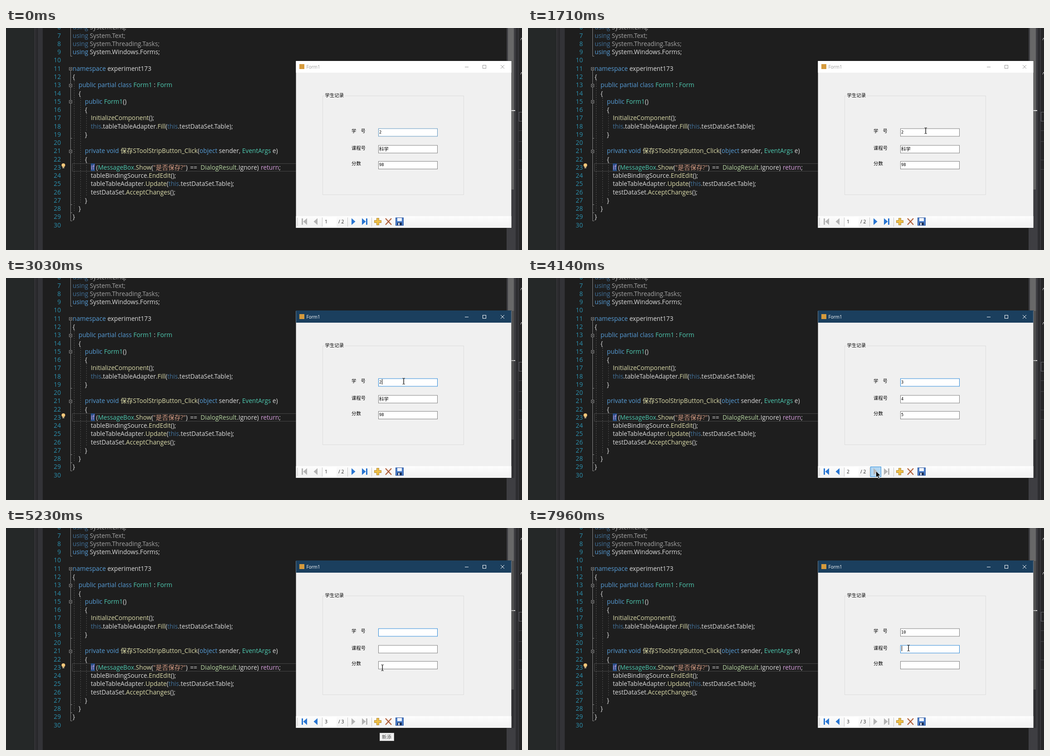
These frames come from a looping animation (1138 px wide and 492 px high, 8000 ms). An HTML page with a canvas:

```html
<!DOCTYPE html>
<html lang="zh">
<head>
<meta charset="utf-8">
<style>
html, body { margin: 0; width: 100%; height: 100%; overflow: hidden; background: #1e1e1e; }
canvas { display: block; }
</style>
</head>
<body>
<canvas id="stage" width="1138" height="492"></canvas>
<script>
const g = document.getElementById('stage').getContext('2d');
const CODE = '13.7px "Open Sans", "Noto Sans CJK SC", sans-serif';
const UI = '10.4px "Noto Sans CJK SC", "Noto Sans CJK", sans-serif';
const FIELD = '8.7px "DejaVu Sans Mono", monospace';
const BLUE = '#2a76d2', GREY = '#b4b4b4';
const INK = {
  b: '#569cd6', w: '#dcdcdc', t: '#4ec9b0', m: '#dcdcaa', s: '#d69d85',
  e: '#b8d7a3', d: '#41719a', f: '#a4a4a4', p: '#d8a0df'
};

// Row number: tokens as "x, ink, text"; without x a token follows the one before
const LINES = {
  6: '147d using |f System.Linq;',
  7: '147d using |f System.Text;',
  8: '147d using |f System.Threading.Tasks;',
  9: '147b using |w System.Windows.Forms;',
  11: '147b namespace |w experiment173',
  12: '147w {',
  13: '160b public partial class |t Form1|w  : |t Form',
  14: '160w {',
  15: '174b public |t Form1|w ()',
  16: '174w {',
  17: '187m InitializeComponent|w ();',
  18: '187d this|w .tableTableAdapter.|m Fill|w (|d this|w .testDataSet.Table);',
  19: '174w }',
  21: '174b private void |m 保存SToolStripButton_Click|w (|b object|w  sender, |t EventArgs|w  e)',
  22: '174w {',
  23: '187p if|w  (|t MessageBox|w .|m Show|w (|s "是否保存?"|w )|406w ==|429e DialogResult|509w .Ignore)|562p return|w ;',
  24: '187w tableBindingSource.|m EndEdit|w ();',
  25: '187w tableTableAdapter.|m Update|w (|d this|w .testDataSet.Table);',
  26: '187w testDataSet.|m AcceptChanges|w ();',
  27: '174w }',
  28: '160w }',
  29: '147w }'
};

// Pointer path: time, x, y, shape until the next key
const PATH = [
  [0, 868, 250, ''], [210, 868, 262, 'beam'], [290, 870, 285, 'beam'], [450, 872, 304, 'beam'],
  [680, 872, 304, 'beam'], [1000, 874, 268, 'beam'], [1470, 877, 227, 'beam'], [1900, 877, 228, 'beam'],
  [3430, 877, 229, ''], [3500, 806, 392, 'arrow'], [3650, 806, 392, 'arrow'], [3850, 767, 428, 'arrow'],
  [4440, 768, 428, 'arrow'], [4560, 823, 428, 'arrow'], [5160, 823, 428, 'arrow'],
  [5230, 830, 310, 'beam'], [5310, 832, 285, 'arrow'], [5450, 835, 252, 'arrow'], [5880, 834, 245, 'arrow'],
  [6110, 832, 241, 'arrow'], [6830, 832, 241, ''], [7270, 832, 243, 'arrow'], [7420, 837, 260, 'beam'],
  [7700, 839, 266, 'beam'], [8000, 839, 266, 'beam']
];
const CARET_ON = [[2020, 2500], [3030, 3560], [4450, 4980], [5510, 6040], [6570, 7270], [7820, 8000]];

const ramp = (t, from, to) => Math.min(1, Math.max(0, (t - from) / (to - from)));
const within = (t, from, to) => t >= from && t < to;

function box(x, y, w, h, color) {
  g.fillStyle = color;
  g.fillRect(x, y, w, h);
}
function frame(x, y, w, h, color) {
  g.strokeStyle = color;
  g.lineWidth = 1;
  g.strokeRect(x + .5, y + .5, w - 1, h - 1);
}
function text(str, x, y, color, font, align = 'left') {
  g.font = font;
  g.textAlign = align;
  g.fillStyle = color;
  g.fillText(str, x, y);
}
function poly(points, fill, stroke, width = 1) {
  g.beginPath();
  points.forEach(([x, y]) => g.lineTo(x, y));
  if (fill) { g.closePath(); g.fillStyle = fill; g.fill(); }
  if (stroke) { g.strokeStyle = stroke; g.lineWidth = width; g.stroke(); }
}
function fade(alpha, draw) {
  g.save();
  g.globalAlpha = alpha;
  draw();
  g.restore();
}

function rowY(row) { return 17 + (row - 7) * 18.26; }

function codeRow(row) {
  const y = rowY(row) + 4.7;
  text(row, 121, y, '#2b91af', CODE, 'right');
  if (!LINES[row]) return;
  let x = 0;
  for (const token of LINES[row].split('|')) {
    const [, start, ink, str] = token.match(/^(\d*)(\w) (.*)$/);
    if (start) x = +start;
    text(str, x, y, INK[ink], CODE);
    x += g.measureText(str).width;
  }
}

function editor() {
  box(0, 0, 1138, 492, '#1e1e1e');
  box(0, 0, 63, 492, '#252828');
  box(63, 0, 7, 492, '#2b2b2e');
  box(63, 0, 1, 492, '#404043');
  box(69, 0, 1, 492, '#202022');
  box(70, 0, 11, 492, '#333337');

  box(1104, 0, 20, 492, '#3e3e42');
  box(1107, 0, 13, 358, '#686868');
  box(1124, 0, 6, 492, '#2d2d30');
  box(1130, 0, 8, 492, '#252526');
  box(1130, 0, 1, 492, '#3f3f46');
  box(1114, 182, 9, 2, '#e6e6e6');
  frame(1131, 186, 9, 21, '#66666b');
  for (const y of [227, 251, 292, 313]) box(1130, y, 8, 1, '#46464a');
  for (const y of [22, 98]) poly([[1135, y + 5], [1137, y], [1138, y + 2]], null, '#c8c8c8');

  frame(146, 300, 500, 18, '#464646');
  box(187, 300, 9, 17, '#264f88');

  // Indent guides and folding marks
  g.setLineDash([2, 3]);
  for (const [x, top, end] of [[150.5, 118, 408], [164.5, 155, 390], [177.5, 190, 228], [177.5, 299, 372]])
    poly([[x, top], [x, end]], null, '#5a5a5a');
  g.setLineDash([]);
  const edge = '#8a8a8a';
  poly([[142.5, 0], [142.5, 62.5], [146, 62.5]], null, edge);
  poly([[142.5, 94], [142.5, 427.5], [146, 427.5]], null, edge);
  for (const y of [244, 391, 409]) box(142, y, 4, 1, edge);
  for (const row of [11, 13, 15, 21]) {
    const y = Math.round(rowY(row)) - 3;
    box(139, y, 7, 7, '#1e1e1e');
    frame(139, y, 7, 7, edge);
    box(141, y + 3, 3, 1, '#c0c0c0');
  }

  for (let row = 6; row <= 30; row++) codeRow(row);

  g.beginPath();
  g.arc(126.5, 304, 4, 0, 7);
  g.fillStyle = '#f3c77a';
  g.fill();
  box(124.5, 308, 4, 3, '#b0a080');
}

function caption(top, color, ink) {
  box(639.5, top, 475, 99 - top, color);
  text('Form1', 662.5, 89.6, ink, '10px "Open Sans", sans-serif');
  box(1012, 86, 8, 1, ink);
  frame(1051, 82, 8, 8, ink);
  poly([[1091, 82], [1099, 90]], null, ink);
  poly([[1099, 82], [1091, 90]], null, ink);
}

function arrowIcon(x, dir, color, bar) {
  poly([[x - 4 * dir, 421.5], [x + 4.5 * dir, 429], [x - 4 * dir, 436.5]], color);
  if (bar) box(x + 6.5 * dir - 1.5, 422, 3, 14, color);
}

function toolbar(t) {
  const shade = g.createLinearGradient(0, 417, 0, 443);
  shade.addColorStop(0, '#fdfdfd');
  shade.addColorStop(1, '#f1f1f1');
  box(639.5, 417, 475, 26, shade);
  for (let y = 421; y < 438; y += 3) box(642, y, 1.5, 1.5, '#b0b0b0');
  for (const x of [697, 753, 806]) box(x, 420, 1, 20, '#c4c4c4');
  box(698, 419, 31, 21, '#fff');

  const hot = within(t, 3800, 4500) ? 755 : within(t, 4540, 5200) ? 808.5 : 0;
  if (hot) {
    box(hot, 418, 24, 23, '#b3d7f3');
    frame(hot, 418, 24, 23, '#2b8ad8');
  }
  const moved = t >= 4100, back = moved ? BLUE : GREY, ahead = moved ? GREY : BLUE;
  arrowIcon(660, -1, back, true);
  arrowIcon(683, -1, back);
  arrowIcon(766, 1, ahead);
  arrowIcon(789, 1, ahead, true);

  const added = t >= 4800, font = '10.4px "Open Sans", sans-serif';
  text(added ? 3 : moved ? 2 : 1, 703, 433, '#222', font);
  text(added ? '/ 3' : '/ 2', 733, 433, '#222', font);

  box(812, 426, 16, 6, '#b48a35');
  box(817, 421, 6, 16, '#b48a35');
  box(813, 427, 14, 4, '#eebf45');
  box(818, 422, 4, 14, '#eebf45');
  poly([[837, 422], [850, 436]], null, '#b0603c', 2.3);
  poly([[850, 422], [837, 436]], null, '#b0603c', 2.3);
  box(859, 420, 18, 18, '#2c559c');
  box(860, 421, 16, 16, '#4a7cc8');
  box(863, 421, 10, 7, '#f4f7fb');
  box(863, 431, 10, 6, '#1f3358');
  box(865, 432, 3, 5, '#e4e9f2');
}

function form(t) {
  const active = ramp(t, 1750, 1960);
  fade(.35, () => box(638.5, 72, 477, 372, '#000'));
  fade(.2 * active, () => box(1114, 73, 7, 370, '#000'));
  box(639.5, 73, 475, 370, '#f0f0f0');
  caption(73, '#fff', '#999');
  fade(active, () => caption(72, '#1b3f5e', '#fff'));
  box(647, 80, 11, 11, '#d59a3c');

  frame(698, 150, 312, 220, '#dcdcdc');
  box(702, 148, 45, 4, '#f0f0f0');
  text('学生记录', 703.5, 153.3, '#000', UI);
  text('学', 762, 231.8, '#000', UI);
  text('号', 782.5, 231.8, '#000', UI);
  text('课程号', 762, 270.3, '#000', UI);
  text('分数', 762, 304.3, '#000', UI);

  const values = t < 4100 ? ['2', '科学', '98']
    : t < 4800 ? ['3', '4', '5']
    : [t < 6830 ? '' : t < 6890 ? '1' : '10', '', ''];
  const focus = t < 1780 ? -1 : t < 7820 ? 0 : 1;
  [222.5, 259.6, 295].forEach((y, i) => {
    box(821, y, 131, 18, '#fff');
    frame(821, y, 131, 18, i === focus ? '#2b88d8' : i === 0 && t < 70 ? '#5c93bd' : '#7f7f7f');
    const han = values[i] === '科学';
    text(values[i], 823, y + (han ? 12.2 : 11), '#000', han ? UI : FIELD);
  });
  if (CARET_ON.some(([from, to]) => within(t, from, to))) {
    const x = t < 4100 ? 829 : within(t, 6830, 6890) ? 829 : within(t, 6890, 7820) ? 834 : 824;
    box(x, focus ? 261 : 224, 1, 12, '#000');
  }
  toolbar(t);
}

function tip(str, x, y, w, alpha) {
  if (alpha <= 0) return;
  fade(alpha, () => {
    box(x, y, w, 18, '#f2f2f2');
    frame(x, y, w, 18, '#c4c4c4');
    text(str, x + 5, y + 13, '#484848', UI);
  });
}

function pointer(t) {
  const i = PATH.findIndex((key, n) => n + 1 === PATH.length - 1 || t < PATH[n + 1][0]);
  const [t0, x0, y0, shape] = PATH[i], [t1, x1, y1] = PATH[i + 1];
  if (!shape) return;
  const k = ramp(t, t0, t1);
  g.save();
  g.translate(x0 + (x1 - x0) * k, y0 + (y1 - y0) * k);
  if (shape === 'beam') {
    box(-.5, -6.5, 1.3, 13, '#000');
    for (const y of [-7, 6]) {
      box(-2.5, y, 2, 1, '#000');
      box(.8, y, 2, 1, '#000');
    }
  } else {
    g.lineJoin = 'round';
    poly([[0, 0], [0, 14], [3.2, 11], [5.5, 16.5], [7.8, 15.5], [5.5, 10.2], [10, 10], [0, 0]], '#000', '#fff', .8);
  }
  g.restore();
}

function draw() {
  const t = performance.now() % 8000;
  editor();
  form(t);
  tip('移到下一条记录', 773, 464, 82, ramp(t, 4200, 4370) * (1 - .3 * ramp(t, 4520, 4590) - .7 * ramp(t, 4700, 4860)));
  tip('新添', 824, 454, 32, ramp(t, 4870, 4990) * (1 - ramp(t, 5230, 5480)));
  pointer(t);
  requestAnimationFrame(draw);
}
draw();
</script>
</body>
</html>
```
